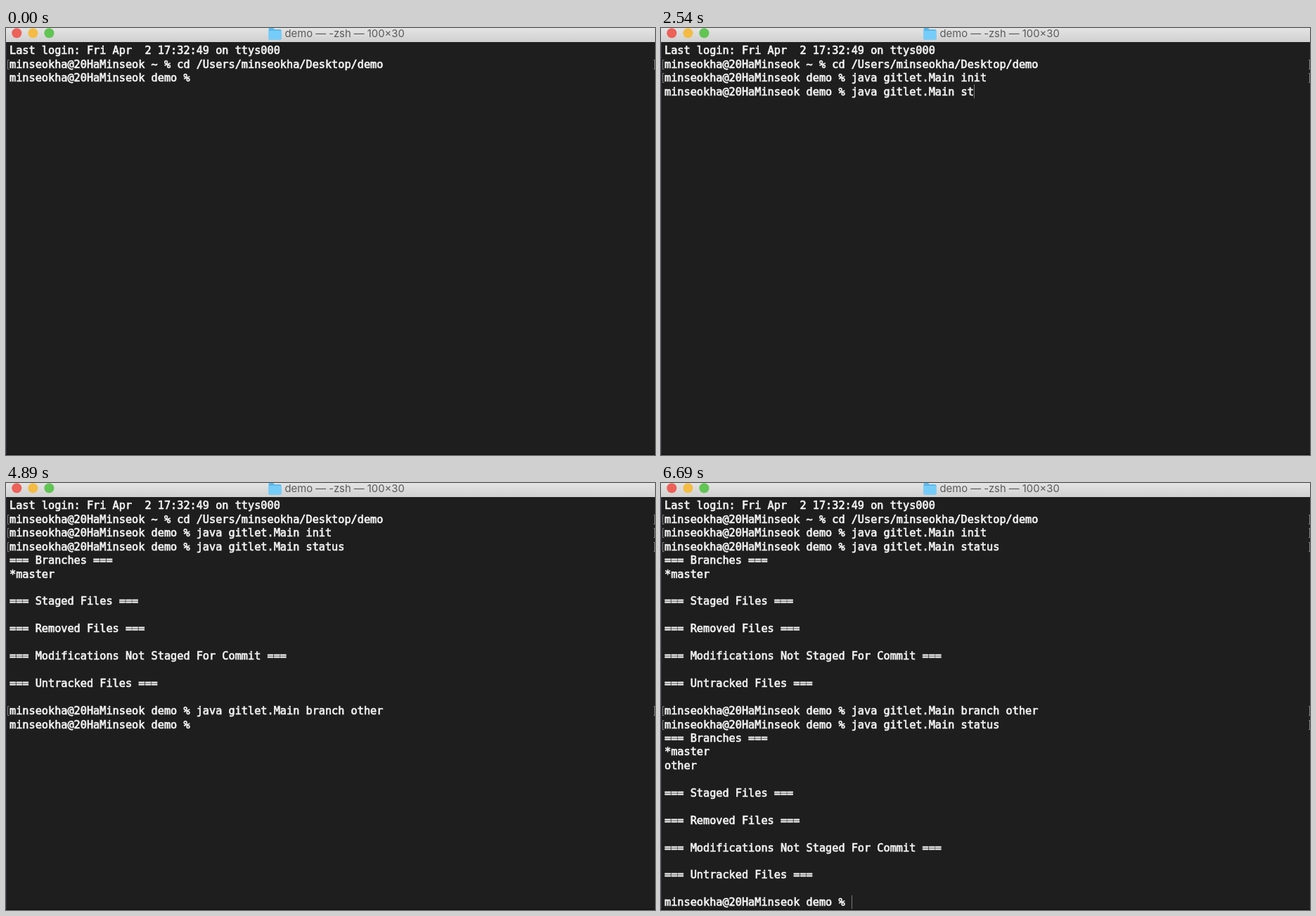
Write an HTML page that moves like this. It is 923 px wide and 607 px high and loops after 6.79 s.

```html
<!DOCTYPE html>
<html lang="en">
<head>
<meta charset="utf-8">
<title>Terminal</title>
<style>
  html, body { margin: 0; width: 100%; height: 100%; overflow: hidden; background: #1e1e1e; }
  svg { display: block; width: 923px; height: 607px; }
  text { white-space: pre; }
  #rows { font: 15.23px "DejaVu Sans Mono", monospace; fill: #f2f2f2; stroke: #f2f2f2; stroke-width: .7; }
  #title { font: 14.8px Inter, sans-serif; fill: #5a5a5a; }
</style>
</head>
<body>
<svg viewBox="0 0 923 607">
  <defs>
    <linearGradient id="bar" x2="0" y2="1">
      <stop offset="0" stop-color="#e4e4e4"/>
      <stop offset="1" stop-color="#d0d0d0"/>
    </linearGradient>
  </defs>
  <rect width="923" height="607" fill="#1e1e1e"/>
  <rect y="20" width="1" height="587" fill="#2c2b38"/>
  <rect y="605.5" width="923" height="1.5" fill="#151315"/>
  <rect width="923" height="20" fill="url(#bar)"/>
  <g>
    <circle cx="15.3" cy="7.3" r="7" fill="#ec6158"/>
    <circle cx="38.4" cy="7.3" r="7" fill="#f4bc45"/>
    <circle cx="61.4" cy="7.3" r="7" fill="#61c554"/>
  </g>
  <path d="M373.5 1.5q0-1.5 1.5-1.5h5l2 2h8q1.5 0 1.5 1.5V15q0 1.5-1.5 1.5H375q-1.5 0-1.5-1.5Z" fill="#5bb9ea"/>
  <path d="M373.5 4h18V15q0 1.5-1.5 1.5H375q-1.5 0-1.5-1.5Z" fill="#76ccf8"/>
  <text id="title" x="396.5" y="13.3">demo — -zsh — 100×30</text>
  <g id="rows"></g>
  <g id="marks" fill="none" stroke="#858585"></g>
  <rect id="cursor" width="1" height="19.5" fill="#777"/>
</svg>
<script>
const LOOP = 6790, LEFT = 5, CHAR = 9.169, LINE = 19.45, BASE = 37.3, ROWS = 30;
const NS = "http://www.w3.org/2000/svg";
const HOST = "minseokha@20HaMinseok";
const PROMPT = HOST + " demo % ";
const JAVA = "java gitlet.Main";
const $ = id => document.getElementById(id);

const status = branches => ["=== Branches ===", ...branches, "",
  "=== Staged Files ===", "", "=== Removed Files ===", "",
  "=== Modifications Not Staged For Commit ===", "",
  "=== Untracked Files ===", ""];

// Each command: pasted stem, typed tail with key times, return, output.
const commands = [
  { paste: 380, stem: JAVA + " ", tail: "init", keys: [830, 880, 930, 980],
    enter: 1080, done: 1380, out: [] },
  { paste: 1890, stem: JAVA + " ", tail: "status", keys: [2440, 2540, 2590, 2640, 2690, 2740],
    enter: 2840, done: 2990, out: status(["*master"]) },
  { paste: 3340, stem: JAVA, tail: " branch other",
    keys: [...Array(13)].map((_, i) => i < 11 ? 3540 + i * 65 : 3690 + i * 50),
    enter: 4390, done: 4640, out: [] },
  { paste: 5140, stem: JAVA + " ", tail: "status", keys: [5440, 5540, 5640, 5690, 5740, 5790],
    enter: 5840, done: 5940, out: status(["*master", "other"]) }
];

// Spans in which the blinking cursor is hidden.
const hidden = [[0, 30], [530, 680], [1630, 1740], [2140, 2340], [3040, 3140],
  [4890, 4990], [6390, 6640]];

function add(parent, tag, attrs) {
  const el = document.createElementNS(NS, tag);
  for (const k in attrs) el.setAttribute(k, attrs[k]);
  return parent.appendChild(el);
}

const baseline = row => BASE + row * LINE;
const lines = [], marks = [];
for (let i = 0; i < ROWS; i++) {
  const y = baseline(i), top = Math.round(y - 12) + 0.5;
  lines.push(add($("rows"), "text", { x: LEFT, y }));
  marks.push(add($("marks"), "path", {
    d: `M4.5 ${top}H2.5v13h2M921 ${top}h1.5v13h-1.5`
  }));
}

function screenAt(t) {
  const rows = ["Last login: Fri Apr  2 17:32:49 on ttys000",
    HOST + " ~ % cd /Users/minseokha/Desktop/demo"];
  const entered = new Set([1]);
  for (const c of commands) {
    const typed = c.keys.filter(k => t >= k).length;
    rows.push(PROMPT + (t >= c.paste ? c.stem + c.tail.slice(0, typed) : ""));
    if (t < c.enter) return { rows, entered };
    entered.add(rows.length - 1);
    if (t < c.done) {
      rows.push("");
      return { rows, entered };
    }
    rows.push(...c.out);
  }
  rows.push(PROMPT);
  return { rows, entered };
}

function draw(t) {
  const { rows, entered } = screenAt(t);
  lines.forEach((el, i) => {
    const s = rows[i] || "";
    if (el.textContent !== s) el.textContent = s;
    marks[i].style.display = entered.has(i) ? "" : "none";
  });
  const last = rows.length - 1, cur = $("cursor");
  cur.setAttribute("x", Math.round(LEFT + rows[last].length * CHAR));
  cur.setAttribute("y", baseline(last) - 15.3);
  cur.style.display = hidden.some(([a, b]) => t >= a && t < b) ? "none" : "";
}

const start = performance.now();
function tick() {
  draw((performance.now() - start) % LOOP);
  requestAnimationFrame(tick);
}
draw(0);
requestAnimationFrame(tick);
</script>
</body>
</html>
```
